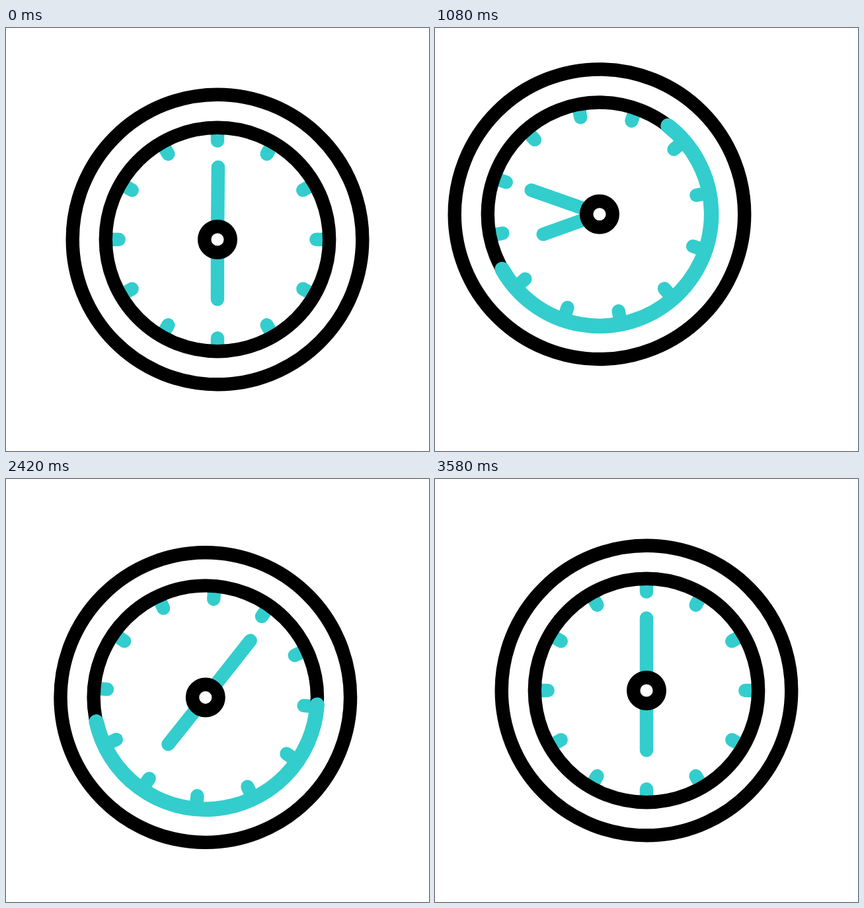
Recreate the animation shown at these times as an HTML page. Size 640 by 640 pixels, loop 3600 ms.

```html
<!DOCTYPE html>
<html lang="en">
<head>
<meta charset="utf-8">
<title>Swinging clock</title>
<style>
  html, body { margin: 0; width: 100%; height: 100%; overflow: hidden; background: #fff; }
  svg { display: block; width: 100vw; height: 100vh; }
  .ink { fill: none; stroke: #000; stroke-width: 20.4; }
  .teal { fill: none; stroke: #33cdcd; stroke-width: 20.4; stroke-linecap: round; }
  #arc { stroke-width: 22.6; }
  #hub { fill: #fff; }
</style>
</head>
<body>
<svg viewBox="0 0 640 640">
  <g id="clock">
    <g id="ticks" class="teal"></g>
    <circle class="ink" r="219.3"/>
    <circle class="ink" r="169.2"/>
    <path id="arc" class="teal"/>
    <line id="minute" class="teal" y2="-109.5"/>
    <line id="hour" class="teal" y2="-90.5"/>
    <circle id="hub" class="ink" r="19.8"/>
  </g>
</svg>
<script>
const LOOP = 3600, BACK = 1820, ARM = 219, RING = 169.2, TURNS = 720;
const RAD = Math.PI / 180;
const $ = id => document.getElementById(id);

// Turning points [time, value] of the fading swing (degrees) and bob (pixels).
const swing = [[232, 0], [1112, 19], [1764, -11], [2298, 7], [2700, -3], [3060, 0]];
const bob = [[0, 0], [905, -38], [1552, 25.7], [2055, -12.4], [2480, 12.6], [2896, 0]];

const part = (t, from, to) => Math.min(1, Math.max(0, (t - from) / (to - from)));
const ease = u => u * u * (3 - 2 * u);
const glide = u => u + u * u - u * u * u;

// Eases from each turning point to the next.
function sway(points, t) {
  let value = points[0][1];
  for (let i = 1; i < points.length; i++) {
    const [t0, a] = points[i - 1], [t1, b] = points[i];
    value += (b - a) * ease(part(t, t0, t1));
  }
  return value;
}

// A hand winds up to its peak angle, rests, then unwinds.
function wind(t, peak, back) {
  return peak * (glide(part(t, 0, 1505)) - ease(part(t, back, back + 1363)));
}

function point(deg) {
  const x = RING * Math.sin(deg * RAD), y = -RING * Math.cos(deg * RAD);
  return x.toFixed(3) + ' ' + y.toFixed(3);
}

function arcPath(from, to) {
  const span = to - from;
  if (span < .1) return '';
  return `M${point(from)}A${RING} ${RING} 0 ${span > 180 ? 1 : 0} 1 ${point(to)}`;
}

function turn(node, deg) {
  node.setAttribute('transform', `rotate(${deg.toFixed(3)})`);
}

function draw(t) {
  // The clock hangs from a pivot at its top edge.
  const tilt = sway(swing, t);
  const x = 320 - ARM * Math.sin(tilt * RAD);
  const y = 320 - ARM * (1 - Math.cos(tilt * RAD)) + sway(bob, t);
  $('clock').setAttribute('transform', `translate(${x.toFixed(3)} ${y.toFixed(3)})`);
  turn($('ticks'), tilt);
  turn($('minute'), tilt + wind(t, 730, 1775));
  turn($('hour'), tilt + 180 + wind(t, 59.6, 1800));

  // The arc runs two turns forward, then the same way back.
  const back = t >= BACK, s = back ? t - BACK : t;
  const lead = TURNS * ease(part(s, 0, 1458));
  const lag = TURNS * ease(part(s, 0, 1750)) ** 1.5;
  $('arc').setAttribute('d', back ? arcPath(TURNS - lead, TURNS - lag) : arcPath(lag, lead));
}

for (let i = 0; i < 12; i++) {
  const tick = document.createElementNS('http://www.w3.org/2000/svg', 'line');
  tick.setAttribute('y1', -149.3);
  tick.setAttribute('y2', -165);
  turn(tick, i * 30);
  $('ticks').append(tick);
}

function frame() {
  draw(performance.now() % LOOP);
  requestAnimationFrame(frame);
}
draw(0);
requestAnimationFrame(frame);
</script>
</body>
</html>
```
